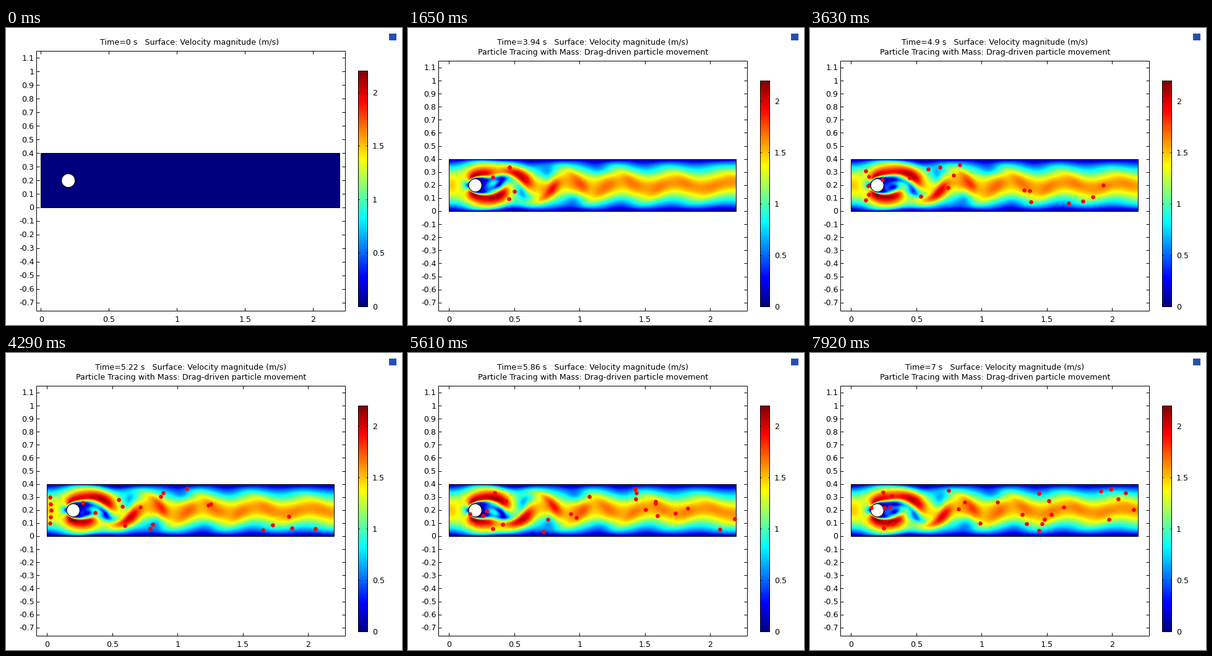
Recreate the animation shown at these times as a matplotlib script. Size 640x480 px, loop 8.25 s.

```python
import itertools

import matplotlib.pyplot as plt
import numpy as np
from matplotlib.animation import FuncAnimation
from matplotlib.colors import LinearSegmentedColormap
from matplotlib.patches import Circle, Rectangle

plt.rcParams["font.family"] = "DejaVu Sans"

# Channel flow past a cylinder, D2Q9 lattice Boltzmann.
N = 16                        # cells per cylinder diameter
DX = 0.1 / N
NX, NY = 22 * N + 1, 4 * N + 2
U = 0.13                      # lattice peak inlet speed, stands for 1.5 m/s
SCALE = 1.5 / U
DT = DX / SCALE
LENGTH, HEIGHT, CENTRE, RADIUS = 2.2, 0.4, 0.2, 0.05
RE_NEAR, RE_FAR, X_SPLIT = 90, 50, 0.55   # smoother flow downstream

c = np.array(list(itertools.product((0, 1, -1), repeat=2)))
cx, cy = c.T
sq = (c * c).sum(1)
w = 4 / 9 * 0.25 ** sq
opp = [int(np.where((c == -v).all(1))[0][0]) for v in c]
shift = cx * NY + cy

SUMS = np.stack([np.ones(9), cx, cy]).astype(np.float32)
M = w[:, None] * np.stack([np.ones(9), 3 * cx, 3 * cy, 4.5 * cx**2 - 1.5,
                           9 * cx * cy, 4.5 * cy**2 - 1.5], axis=1)


def collision(re):
    """Regularised collision as one matrix on [populations, moments]."""
    omega = 1 / (3 * (2 / 3 * U * N / re) + 0.5)
    k = (1 - omega) * 4.5 * w[:, None] * ((c @ c.T) ** 2 - sq / 3)
    return np.hstack([k, (np.eye(9) - k) @ M]).astype(np.float32)


NEAR, FAR = collision(RE_NEAR), collision(RE_FAR)
M = M.astype(np.float32)

xs = np.arange(NX) * DX
ys = (np.arange(NY) - 0.5) * DX
X, Y = np.meshgrid(xs, ys, indexing="ij")
R = np.hypot(X - CENTRE, Y - CENTRE)
blocked = R < RADIUS
blocked[:, [0, -1]] = True
solid = np.flatnonzero(blocked)
inlet = (U * np.clip(4 * ys * (HEIGHT - ys) / HEIGHT**2, 0, None)).astype(np.float32)


def equilibrium(rho, u, v):
    return M @ np.stack([rho, rho * u, rho * v, rho * u * u, rho * u * v, rho * v * v])


def start_velocity():
    eta = (Y - CENTRE) / CENTRE
    psi = U * CENTRE * (eta - eta**3 / 3)
    psi *= 1 - np.exp(-(np.clip(R - RADIUS, 0, None) / (1.2 * RADIUS)) ** 2)
    u = np.gradient(psi, DX, axis=1) * ~blocked
    v = -np.gradient(psi, DX, axis=0) * ~blocked
    return u.ravel().astype(np.float32), v.ravel().astype(np.float32)


def snapshot(u, v):
    return np.stack([u, v]).reshape(2, NX, NY) * ~blocked * SCALE


def simulate(kick=0.9, kick_end=1.15, record=3.0, end=3.9, every=16):
    """Return the symmetric early flow and snapshots of the periodic one."""
    buf = np.zeros((15, NX * NY), np.float32)
    f, mom = buf[:9], buf[9:]
    g = np.empty_like(f)
    F = f.reshape(9, NX, NY)
    split = round(X_SPLIT / DX) * NY
    u, v = start_velocity()
    f[:] = equilibrium(np.ones_like(u), u, v)
    sway = (inlet * (1 + 0.5 * np.sin(2 * np.pi * ys / HEIGHT))).astype(np.float32)
    still = np.zeros_like(inlet)
    early, shots = None, []
    for n in range(int(end / DT)):
        t = n * DT
        mom[:3] = SUMS @ f
        u, v = mom[1] / mom[0], mom[2] / mom[0]
        if early is None and t >= kick:
            early = snapshot(u, v)
        if t >= record and n % every == 0:
            shots.append(snapshot(u, v))
        mom[3] = mom[1] * u
        mom[4] = mom[1] * v
        mom[5] = mom[2] * v
        g[:, :split] = NEAR @ buf[:, :split]
        g[:, split:] = FAR @ buf[:, split:]
        g[:, solid] = f[:, solid][opp]
        for i in range(9):
            f[i] = np.roll(g[i], shift[i])
        flow = sway if kick < t < kick_end else inlet
        F[:, 0] = equilibrium(F[:, 1].sum(0), flow, still)
        rho, ju, jv = SUMS @ F[:, -2]
        F[:, -1] = equilibrium(1 + 0.97 * (rho - 1), ju / rho, jv / rho)
    return early, np.array(shots)


early, shots = simulate()

# Phase of the wake: at x = 0.7 the lower streak is strongest at t = 4.58 s.
PERIOD, T_LOW, X_LOW = 0.347, 4.58, 0.70
col = round(X_LOW / DX)
row = round(0.15 / DX)
swing = shots[:, 0, col, NY - 1 - row] - shots[:, 0, col, row]
up = np.where((swing[:-1] < 0) & (swing[1:] >= 0))[0]
cross = up + swing[up] / (swing[up] - swing[up + 1])
first, span = cross[-2], cross[-1] - cross[-2]
low = up[-2] + np.argmin(swing[up[-2]:up[-1] + 1])


def shedding(t):
    q = first + (low - first + (t - T_LOW) / PERIOD * span) % span
    k = int(q)
    return shots[k] + (q - k) * (shots[k + 1] - shots[k])


def flow_at(t):
    if t == 0:
        return np.zeros_like(early)
    mix = np.clip((t - 1.6) / 2, 0, 1)
    return early + mix * (shedding(t) - early)


def sample(field, p):
    gx = np.clip(p[:, 0] / DX, 0, NX - 1.01)
    gy = np.clip(p[:, 1] / DX + 0.5, 0, NY - 1.01)
    i, j = gx.astype(int), gy.astype(int)
    a, b = gx - i, gy - j
    below = field[:, i, j] * (1 - a) + field[:, i + 1, j] * a
    above = field[:, i, j + 1] * (1 - a) + field[:, i + 1, j + 1] * a
    return (below * (1 - b) + above * b).T


# Particles: five are released at the inlet every 0.4 s and dragged along.
T_FIRST, STEP, LAG = 3.6, 0.005, 0.01


def trace():
    lanes = np.column_stack([np.zeros(5), np.linspace(0.1, 0.3, 5)])
    p, v = np.empty((0, 2)), np.empty((0, 2))
    track = []
    for n in range(681):
        field = shedding(T_FIRST + n * STEP)
        if n % 80 == 0:
            p = np.vstack([p, lanes])
            v = np.vstack([v, sample(field, lanes)])
        track.append(p.copy())
        v = v + (sample(field, p) - v) * (1 - np.exp(-STEP / LAG))
        p = p + v * STEP
        d = p - CENTRE
        r = np.hypot(*d.T)
        hit = r < RADIUS + 0.002
        p[hit] = CENTRE + d[hit] * ((RADIUS + 0.002) / r[hit])[:, None]
    return track


track = trace()

# Drawing, in pixel coordinates.
RAINBOW = LinearSegmentedColormap.from_list("rainbow", [
    (0, (0, 0, 0.5)), (0.125, (0, 0, 1)), (0.375, (0, 1, 1)),
    (0.625, (1, 1, 0)), (0.875, (1, 0, 0)), (1, (0.5, 0, 0))], N=512)
VMAX = 2.2
PX = 0.72                     # one pixel in points
SNAP = 0.5                    # keeps thin lines on their own pixel
LEFT, RIGHT, BOTTOM = 49.5, 548.5, 457.5

fig = plt.figure(figsize=(6.4, 4.8), dpi=100, facecolor="white")
ax = fig.add_axes([0, 0, 1, 1])


def label(x, y, text, ha="center"):
    ax.text(x, y, text, ha=ha, va="baseline", fontsize=12.6 * PX, color="black")


def line(x, y):
    ax.plot(np.subtract(x, SNAP), np.subtract(y, SNAP), color="black", lw=PX,
            solid_capstyle="butt")


def box(x0, y0, x1, y1, **kw):
    style = dict(fill=False, ec="black", lw=PX)
    style.update(kw)
    return ax.add_patch(Rectangle((x0 - SNAP, y0 - SNAP), x1 - x0, y1 - y0, **style))


def draw_axes(top, px, py):
    box(LEFT, top, RIGHT, BOTTOM)
    for i in range(-7, 12):
        y = py(i / 10)
        line([LEFT, LEFT + 5], [y, y])
        line([RIGHT - 5, RIGHT], [y, y])
        label(45.5, y + 4, f"{i / 10:g}", "right")
    for i in range(5):
        x = px(i / 2)
        line([x, x], [BOTTOM - 5, BOTTOM])
        line([x, x], [top, top + 5])
        label(x, 475, f"{i / 2:g}")


def draw_bar(top):
    x0, x1, y0 = 569.5, 584.5, 450.5
    ax.imshow(np.linspace(0, 1, 400)[:, None], cmap=RAINBOW, origin="lower",
              extent=(x0, x1, y0, top), aspect="auto", interpolation="bilinear")
    box(x0, top, x1, y0)
    for i in range(5):
        y = y0 - (y0 - top) * i / 2 / VMAX
        line([x0, x0 + 2], [y, y])
        line([x1 - 2, x1], [y, y])
        label(592, y + 4.5, f"{i / 2:g}", "left")


def draw_flow(t, px, py):
    speed = np.hypot(*flow_at(t))
    speed[:, 0], speed[:, -1] = -speed[:, 1], -speed[:, -2]
    h = DX / 2
    im = ax.imshow(speed.T, cmap=RAINBOW, vmin=0, vmax=VMAX, origin="lower",
                   extent=(px(-h), px(LENGTH + h), py(-2 * h), py(HEIGHT + 2 * h)),
                   aspect="auto", interpolation="bicubic")
    im.set_clip_path(box(px(0), py(HEIGHT), px(LENGTH), py(0), zorder=2))
    ax.add_patch(Circle((px(CENTRE), py(CENTRE)), px(RADIUS) - px(0),
                        fc="white", ec="black", lw=PX, zorder=2))


def sim_time(k):
    i = k * 193 // 24
    return 0.2 * i if i < 18 else 3.5 + 0.02 * (i - 18)


def draw(k):
    t = sim_time(k)
    seeded = t > T_FIRST
    if seeded:
        x0, y0, unit, top, bar, mid = 66.5, 296.5, 211, 53.5, 85.5, 299
    else:
        x0, y0, unit, top, bar, mid = 56.8, 290.5, 219.6, 37.5, 69.5, 297

    def px(x):
        return x0 + unit * x

    def py(y):
        return y0 - unit * y

    ax.clear()
    ax.set_axis_off()
    draw_flow(t, px, py)
    draw_axes(top, px, py)
    draw_bar(bar)
    label(mid, 27, f"Time={t:.4g} s   Surface: Velocity magnitude (m/s)")
    if seeded:
        label(mid, 43, "Particle Tracing with Mass: Drag-driven particle movement")
        p = track[round((t - T_FIRST) / STEP)]
        p = p[p[:, 0] < LENGTH]
        ax.scatter(px(p[:, 0]), py(p[:, 1]), s=(6.6 * PX) ** 2, c="red",
                   linewidths=0, zorder=3)
    box(619, 9, 631, 20, fill=True, fc="#2450b4", ec="none")
    ax.set_xlim(0, 640)
    ax.set_ylim(480, 0)
    return []


anim = FuncAnimation(fig, draw, frames=25, init_func=lambda: [], interval=330,
                     repeat=True, repeat_delay=0)
plt.show()
```
